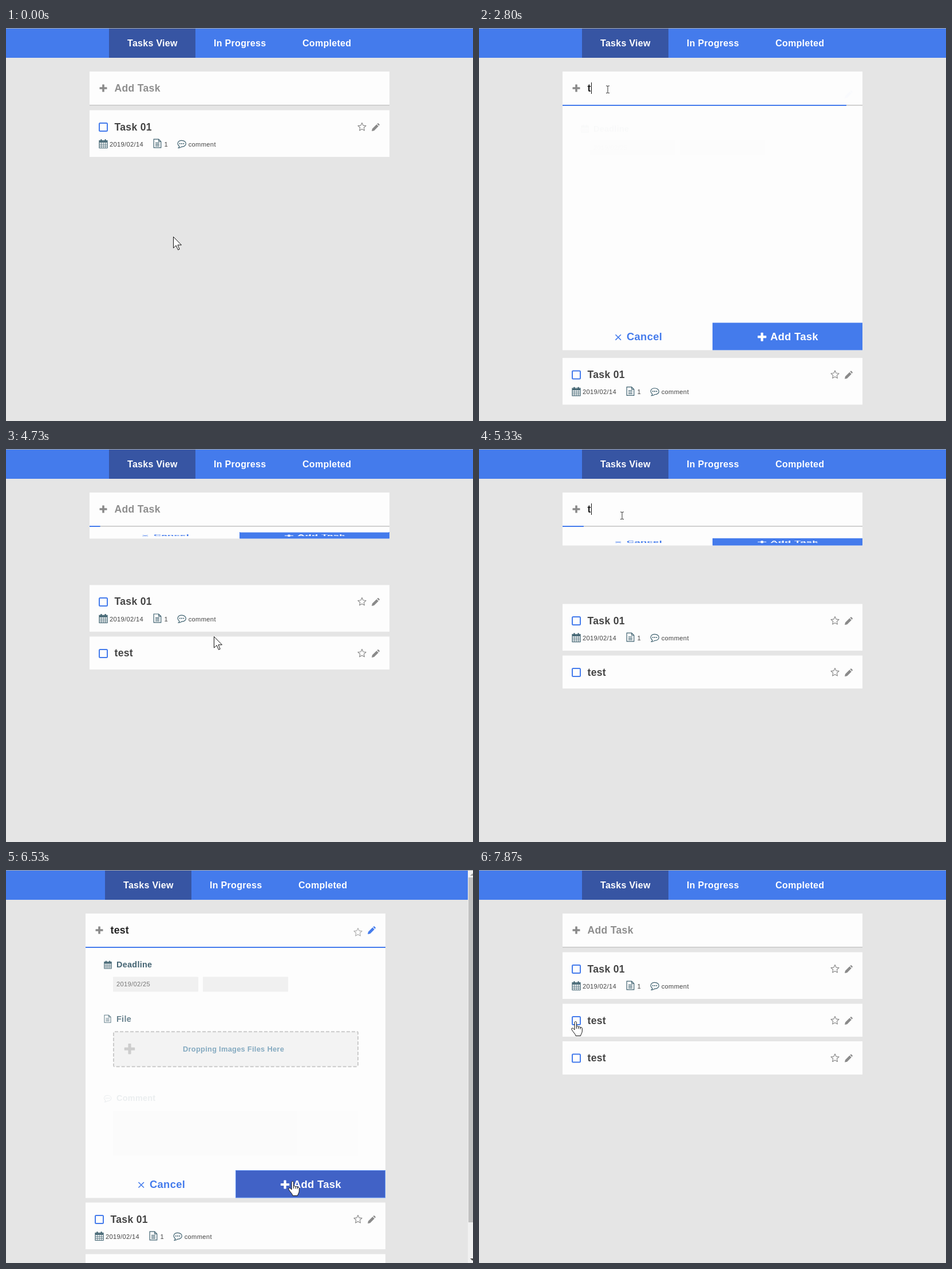
An HTML page that plays this animation: 816x686 px, repeating every 8 s.

```html
<!DOCTYPE html>
<html lang="en">
<head>
<meta charset="utf-8">
<title>Task list</title>
<style>
  html, body { margin: 0; width: 100%; height: 100%; overflow: hidden; background: #e5e5e5; }
  svg { display: block; font-family: "Liberation Sans", Arial, sans-serif; letter-spacing: .3px; }
  .tab { font: bold 16px "Liberation Sans", Arial, sans-serif; fill: #fff; }
  .title { font-size: 17.6px; font-weight: bold; fill: #444; }
  .label { font-size: 14.4px; font-weight: bold; fill: #446473; }
  .button { font-size: 18.4px; font-weight: bold; }
  .hint { font-size: 12.8px; font-weight: bold; fill: #6796b2; }
  .small { font-size: 11.2px; fill: #444; }
  .card { fill: #fdfdfd; }
  .field { fill: #f0f0f0; }
  .blue { fill: #447bec; }
  .slate { color: #3f6270; }
  .grey { color: #8a8a8a; }
  .cursor { fill: #fff; stroke: #111; stroke-linejoin: round; }
</style>
</head>
<body>
<svg width="816" height="686" viewBox="0 0 816 686">
  <defs>
    <g id="plus"><path d="M-6.5-1.2q0-.6.6-.6h4.1v-4.1q0-.6.6-.6h2.4q.6 0 .6.6v4.1h4.1q.6 0 .6.6v2.4q0 .6-.6.6h-4.1v4.1q0 .6-.6.6h-2.4q-.6 0-.6-.6v-4.1h-4.1q-.6 0-.6-.6z"/></g>
    <path id="star" fill="none" stroke="currentColor" stroke-width="1.15" stroke-linejoin="round"/>
    <path id="pencil" fill="currentColor" d="M-7 7l.9-4.1 7.6-7.6 3.3 3.3-7.6 7.6zM2.4-5.6l1-1q.7-.6 1.4 0l1.8 1.8q.6.7 0 1.4l-1 1z"/>
    <g id="calendar" fill="none" stroke="currentColor">
      <path d="M-7-5.5H7V7.5H-7z" stroke-width="1.2"/>
      <path d="M-7-3.4H7" stroke-width="2.6"/>
      <path d="M-7 1H7M-7 4.2H7M-3.5-2V7.5M0-2V7.5M3.5-2V7.5" stroke-width=".8"/>
      <path d="M-3.6-7.8v3.4M3.6-7.8v3.4" stroke-width="2.2"/>
    </g>
    <g id="file" fill="none" stroke="currentColor" stroke-width="1.2">
      <path d="M-6.3-7.4H2.2L6.3-3.3V7.4H-6.3zM2.2-7.4v4.1h4.1"/>
      <path d="M-3.5-.8h7M-3.5 1.8h7M-3.5 4.4h7"/>
    </g>
    <g id="bubble" fill="none" stroke="currentColor" stroke-width="1.2">
      <path d="M-4 4.2C-9-.2-7-6.2 0-6.2 9.5-6.2 10 4.8 0 4.8Q-2.4 6.9-5.6 6.8-4.2 5.6-4 4.2z"/>
      <path d="M-4.1-.7h1.9M-.9-.7H1M2.3-.7h1.9" stroke-width="1.8"/>
    </g>
  </defs>

  <rect width="816" height="52" class="blue"/>
  <g id="page">
    <rect x="180" width="151" height="52" fill="#3755a3"/>
    <g class="tab">
      <text x="212" y="32">Tasks View</text>
      <text x="363" y="32">In Progress</text>
      <text x="518" y="32">Completed</text>
    </g>

    <g id="panel">
      <rect id="sheet" x="146" width="524" class="card"/>
      <g transform="translate(0 -135.5)">
        <g class="item">
          <use href="#calendar" class="slate" transform="translate(185 165.3) scale(.88)"/>
          <text x="200" y="170.3" class="label">Deadline</text>
          <rect x="194" y="186.5" width="149" height="26" rx="1" class="field"/>
          <rect x="351" y="186.5" width="149" height="26" rx="1" class="field"/>
          <text x="200" y="203" class="small" style="fill:#777">2019/02/25</text>
        </g>
        <g class="item">
          <use href="#file" class="slate" transform="translate(184.5 257.5) scale(.88)"/>
          <text x="200" y="263" class="label">File</text>
          <rect x="195" y="280" width="427" height="61" rx="2" fill="#f1f1f1" stroke="#bfbfbf" stroke-width="2" stroke-dasharray="6 3"/>
          <use href="#plus" fill="#c2c2c2" transform="translate(223 310) scale(1.42)"/>
          <text x="316" y="314.4" class="hint">Dropping Images Files Here</text>
        </g>
        <g class="item">
          <use href="#bubble" class="slate" transform="translate(184.5 389) scale(.88)"/>
          <text x="200" y="393.3" class="label">Comment</text>
          <rect x="194" y="411" width="428" height="78" class="field"/>
        </g>
      </g>
      <g id="buttons" class="button">
        <path d="M238.5-18.5l9.5 9.5M248-18.5l-9.5 9.5" transform="translate(0 -9)" stroke="#447bec" stroke-width="1.6"/>
        <text x="258" y="-17.7" class="blue">Cancel</text>
        <rect id="submit" x="408.5" y="-48" width="261" height="47.5"/>
        <use href="#plus" fill="#fff" transform="translate(494.5 -23.5) scale(1.17)"/>
        <text x="509" y="-17.7" fill="#fff">Add Task</text>
      </g>
    </g>

    <rect x="146" y="76" width="524" height="59.5" class="card"/>
    <rect x="146" y="134" width="524" height="1.5" fill="#c4c4c4"/>
    <rect id="line" x="146" y="134" height="2" class="blue"/>
    <use href="#plus" x="170" y="105" fill="#8a8a8a"/>
    <text id="entry" x="189.5" y="111" class="title"></text>
    <rect id="caret" y="95" width="1" height="20" fill="#111"/>
    <use id="formStar" href="#star" class="grey"/>
    <use id="formPencil" href="#pencil" color="#447bec"/>

    <g id="list"></g>
  </g>

  <g id="scrollbar">
    <rect x="807" width="9" height="686" fill="#f1f1f1"/>
    <rect id="thumb" x="808" y="13" width="8" fill="#c1c1c1"/>
    <path d="M811 10l4-4 4 4z" fill="#a3a3a3"/>
    <path d="M811 678l4 4 4-4z" fill="#505050"/>
  </g>
  <rect width="816" height="1" fill="#a9a9a9"/>

  <g class="cursor">
    <path id="arrow" d="M.5.5V20L5.2 15.7 8.6 23.3 11.2 22.1 8 14.8h6.5z"/>
    <g id="hand">
      <path d="M-1 15V2.2C-1 0 2.4 0 2.4 2.2V9.5C3 8 5.8 8.2 5.8 10.2 6.6 8.8 9 9.2 9 11.2 10 10 12.3 10.6 12.3 12.8V17C12.3 21 10 22 9.5 25.5H1C.6 22.5-2.5 20-5 16.2-6.8 13.4-6.5 12-4.8 12-3 12-2 14-1 15z"/>
      <path d="M2.4 9.5V13M5.8 10.2V13.4M9 11.2V13.8" fill="none"/>
    </g>
    <path id="beam" d="M-3-6h2l1 .8 1-.8h2M-3 6.5h2l1-.8 1 .8h2M0-5.2V5.7" fill="none" stroke="#333"/>
  </g>
</svg>

<script>
const $ = id => document.getElementById(id);
const set = (el, attrs) => { for (const k in attrs) el.setAttribute(k, attrs[k]); };
const show = (el, on) => { el.style.display = on ? '' : 'none'; };
const clamp = x => Math.max(0, Math.min(1, x));

const LOOP = 8000, PANEL = 437;
const cycles = [
  { open: 2368, click: 4242, keys: [2368, 2830, 2960, 3090], focus: 2100 },
  { open: 5232, click: 6675, keys: [5232, 5560, 5730, 5900], focus: 5090 }
];
// time, x, y of the pointer's hot spot
const path = [
  [0, 292, 364], [130, 292, 364], [800, 163, 168], [1400, 163, 168],
  [1730, 220, 119], [1870, 220, 119], [2100, 225, 107], [3250, 225, 107],
  [4150, 482, 551], [4400, 482, 551], [5050, 250, 116], [5850, 250, 116],
  [6400, 500, 543], [6760, 500, 543], [7850, 168, 264], [8000, 168, 264]
];
const shapes = [
  [0, 'arrow'], [735, 'hand'], [1460, 'arrow'], [1900, 'beam'], [3320, 'arrow'],
  [4000, 'hand'], [4460, 'arrow'], [5000, 'beam'], [5910, 'arrow'],
  [6270, 'hand'], [6820, 'arrow'], [7720, 'hand']
];

// CSS "ease": cubic-bezier(.25, .1, .25, 1)
function ease(x) {
  x = clamp(x);
  if (x === 0 || x === 1) return x;
  const bez = (a, b, u) => 3 * a * u * (1 - u) ** 2 + 3 * b * u * u * (1 - u) + u ** 3;
  let lo = 0, hi = 1;
  for (let i = 0; i < 24; i++) {
    const mid = (lo + hi) / 2;
    if (bez(.25, .25, mid) < x) lo = mid; else hi = mid;
  }
  return bez(.1, 1, lo);
}

let star = '';
for (let i = 0; i < 10; i++) {
  const r = i % 2 ? 3.5 : 7.4, a = Math.PI * (i / 5 - .5);
  star += (i ? 'L' : 'M') + (r * Math.cos(a)).toFixed(2) + ' ' + (r * Math.sin(a) + .4).toFixed(2);
}
$('star').setAttribute('d', star + 'z');

const meta = `
  <use href="#calendar" x="170" y="58.5" class="slate"/><text x="181" y="63.5" class="small">2019/02/14</text>
  <use href="#file" x="264.5" y="58" class="slate"/><text x="276.5" y="63.5" class="small">1</text>
  <use href="#bubble" x="307" y="59" class="slate"/><text x="318.7" y="63.5" class="small">comment</text>`;
const task = (name, y, height, extra = '') => `<g transform="translate(0 ${y})">
  <rect x="146" width="524" height="${height}" class="card"/>
  <rect x="163" y="22.5" width="14" height="14" rx="1.5" fill="none" stroke="#447bec" stroke-width="2"/>
  <text x="189.5" y="35" class="title">${name}</text>
  <use href="#star" x="622" y="29" class="grey"/><use href="#pencil" x="646" y="29.5" class="grey"/>${extra}</g>`;
$('list').innerHTML = task('Task 01', 143.5, 81.5, meta) + task('test', 233.5, 57.5) + task('test', 299, 58);
const bottoms = [225, 291, 357];
const items = document.querySelectorAll('.item');

function pointer(t) {
  const i = Math.max(1, path.findIndex(k => k[0] > t));
  const [t0, x0, y0] = path[i - 1], [t1, x1, y1] = path[i];
  const u = clamp((t - t0) / (t1 - t0)), e = u * u * (3 - 2 * u);
  return [x0 + (x1 - x0) * e, y0 + (y1 - y0) * e];
}

function drawPanel(t, run, height) {
  const closing = run && t >= run.click;
  const fade = delay => !run ? 0
    : ease((Math.min(t, run.click) - run.open - delay) / 1000) * (1 - ease((t - run.click) / 300));
  const scale = grow(t - 7, run);
  show($('panel'), height > .5);
  set($('panel'), { transform: `translate(0 135.5) scale(1 ${scale})` });
  set($('sheet'), { height });
  set($('buttons'), { transform: `translate(0 ${height})` });
  items.forEach((el, i) => {
    const o = fade(400 * (i + 1));
    const wide = closing ? 1 + .01 * (1 - o) : 1;
    set(el, { opacity: o, transform: `translate(${408 * (1 - wide)} ${11 * (1 - o)}) scale(${wide} 1)` });
  });
  [['formStar', 622, 900], ['formPencil', 646, 400]].forEach(([id, x, delay]) => {
    const o = closing ? 0 : fade(delay);
    set($(id), { opacity: o, x, y: 105 + 11 * (1 - o) });
  });
  const line = !run ? 0 : closing
    ? 1 - ease((t - run.click - 85) / 530)
    : ease((t - run.open - 55) / 530);
  set($('line'), { width: 524 * line });
}

function grow(t, run) {
  if (!run) return 0;
  return t < run.click ? ease((t - run.open) / 500) : 1 - ease((t - run.click - 30) / 950);
}

function drawEntry(t) {
  const run = cycles.find(c => t >= c.focus && t < c.click);
  const typed = run ? run.keys.filter(k => k <= t).length : 0;
  const entry = $('entry');
  entry.textContent = typed ? 'test'.slice(0, typed) : 'Add Task';
  entry.style.fill = typed ? '#222' : '#8e8e8e';
  const since = run && t - (typed ? run.keys[typed - 1] : run.focus);
  show($('caret'), run && since % 1060 < 530);
  set($('caret'), { x: Math.round(189.5 + (typed ? entry.getComputedTextLength() : 0)) });
}

function draw(t) {
  const run = cycles.filter(c => c.open <= t).pop();
  const height = PANEL * grow(t, run);
  drawPanel(t, run, height);
  drawEntry(t);

  const added = cycles.filter(c => c.click <= t).length;
  [...$('list').children].forEach((el, i) => show(el, i <= added));
  set($('list'), { transform: `translate(0 ${height})` });

  const content = bottoms[added] + height + 24;
  const scrolls = content > 686.5;
  show($('scrollbar'), scrolls);
  set($('thumb'), { height: 660 * Math.min(1, 686 / content) });
  set($('page'), { transform: `translate(${scrolls ? -7 : 0} 0)` });

  const shape = shapes.filter(s => s[0] <= t).pop()[1];
  const [x, y] = pointer(t).map(Math.round);
  ['arrow', 'hand', 'beam'].forEach(id => show($(id), id === shape));
  set($(shape), { transform: `translate(${x} ${y})` });
  const hover = shape === 'hand' && x > 400;
  set($('submit'), { fill: hover ? '#4162c6' : '#447bec', stroke: hover ? '#5b8df0' : '#447bec' });
}

const start = performance.now();
function tick() {
  draw((performance.now() - start) % LOOP);
  requestAnimationFrame(tick);
}
tick();
</script>
</body>
</html>
```
